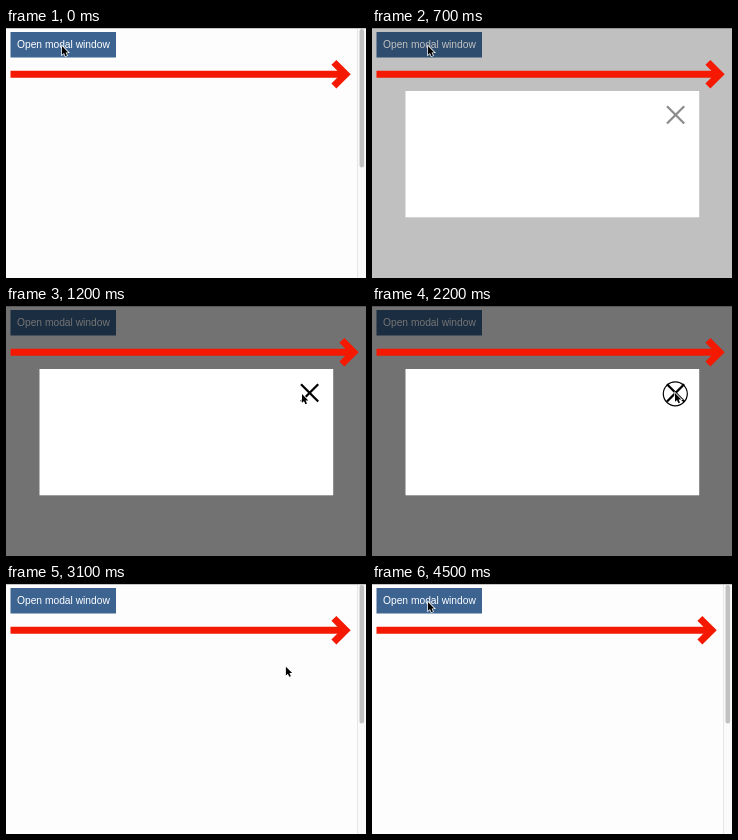
Recreate the animation shown at these times as an HTML page. Size 360 by 250 pixels, loop 5000 ms.

```html
<!DOCTYPE html>
<html lang="en">
<head>
<meta charset="utf-8">
<title>Modal window</title>
<style>
  html, body { margin: 0; width: 100%; height: 100%; overflow: hidden; background: #fdfdfd; }
  svg { display: block; width: 100vw; height: 100vh; }
  text { font: 10.25px "Liberation Sans", Arial, sans-serif; fill: #fff; }
</style>
</head>
<body>
<svg viewBox="0 0 360 250">
  <rect width="360" height="250" fill="#fdfdfd"/>
  <rect width="360" height="1" fill="#c4c4c4"/>
  <g id="scrollbar">
    <rect x="351" y="1" width="9" height="249" fill="#fafafa"/>
    <path d="M351.5 1V250" stroke="#e6e6e6"/>
    <rect x="353.5" y="1" width="4.6" height="138.5" rx="2.3" fill="#c1c1c1"/>
  </g>
  <rect x="4.5" y="4" width="105.5" height="25.5" fill="#3d6491"/>
  <text x="11" y="20.3">Open modal window</text>
  <rect id="shade" width="360" height="250" fill="#000"/>
  <g fill="none" stroke="#f41900" stroke-width="7">
    <path id="shaft"/>
    <path id="head" d="M-16.8 -11.85L-4.95 0L-16.8 11.85"/>
  </g>
  <g id="modal">
    <rect x="33.5" y="63" width="293.7" height="126.3" fill="#fff"/>
    <g id="close" fill="none" stroke="#000">
      <path d="M295 78.3L312.2 95.5M312.2 78.3L295 95.5" stroke-width="2.3"/>
      <circle id="ring" cx="303.3" cy="87.8" r="12" stroke-width="1.2"/>
    </g>
  </g>
  <path id="cursor" d="M0 0V8.8L2 7L3.4 10.2L5 9.5L3.6 6.4H6.3Z"
        fill="#000" stroke="#fff" stroke-width="1.4" paint-order="stroke"/>
</svg>
<script>
const LOOP = 5000, STEP = 100, OPEN = 400, CLOSE = 2300;
const el = id => document.getElementById(id);

// Eased progress from 0 to 1 between two times.
function ease(t, from, to) {
  const p = Math.min(1, Math.max(0, (t - from) / (to - from)));
  return p * p * (3 - 2 * p);
}

const home = { x: 56, y: 18 };
const moves = [
  { from: 900, to: 1200, x: 296, y: 88 },
  { from: 1500, to: 1800, x: 303, y: 87 },
  { from: 3000, to: 3400, x: 155, y: 59 },
  { from: 3500, to: 4100, x: 59, y: 16 },
  { from: 4100, to: 4300, x: 69, y: 14 },
  { from: 4300, to: 4500, ...home }
];

function pointer(t) {
  return moves.reduce((pos, move) => {
    const p = ease(t, move.from, move.to);
    return { x: pos.x + (move.x - pos.x) * p, y: pos.y + (move.y - pos.y) * p };
  }, home);
}

function draw(t) {
  const open = t >= OPEN && t < CLOSE;
  const fade = open ? ease(t, 510, 920) : 0;
  const { x, y } = pointer(t);
  const tip = open ? 352.7 : 344.7;

  el("scrollbar").style.display = open ? "none" : "";
  el("modal").style.display = open ? "" : "none";
  el("shade").style.opacity = .55 * fade;
  el("close").style.opacity = fade;
  el("ring").style.opacity = ease(t, 1500, 1800);
  el("shaft").setAttribute("d", `M4.5 46.2H${tip - 6}`);
  el("head").setAttribute("transform", `translate(${tip} 46.2)`);
  el("cursor").setAttribute("transform", `translate(${x} ${y})`);
}

const start = performance.now();
function tick() {
  const t = (performance.now() - start) % LOOP;
  draw(Math.floor(t / STEP) * STEP);
  requestAnimationFrame(tick);
}
tick();
</script>
</body>
</html>
```
